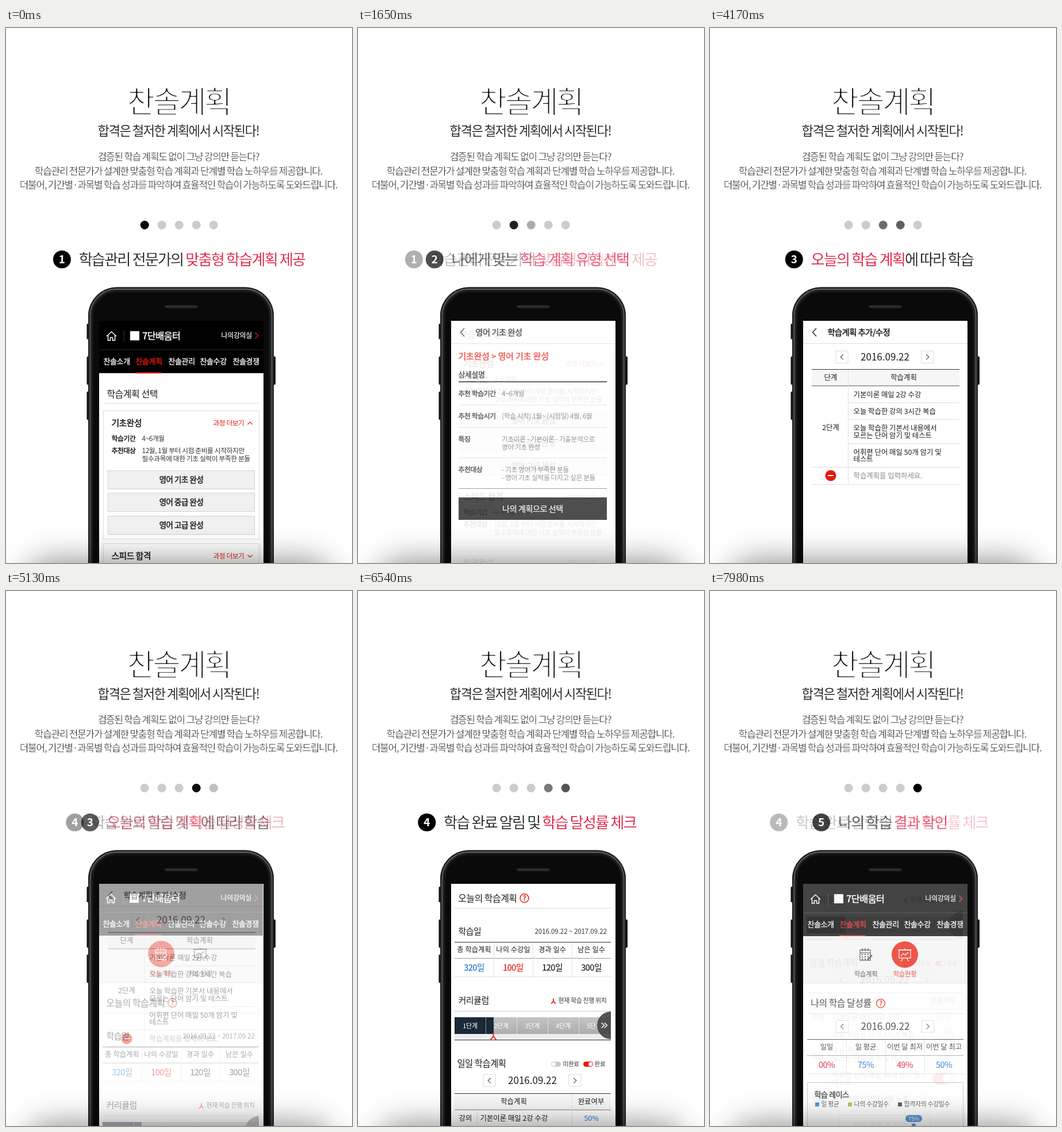
Write an HTML page with a canvas that moves like this. It is 602 by 930 pixels and loops after 8000 ms.

```html
<!DOCTYPE html>
<html lang="ko">
<head>
<meta charset="utf-8">
<title>찬솔계획</title>
<style>
html, body { margin: 0; width: 602px; height: 930px; overflow: hidden; background: #fff; }
canvas { display: block; }
</style>
</head>
<body>
<canvas id="stage" width="602" height="930"></canvas>
<script>
const W = 602, H = 930, LOOP = 8000, STEP = 30, FADE = 450;
const MARKS = [0, 1340, 3270, 4965, 7650];
const RED = '#e8190a', PINK = '#e0163c', BLUE = '#1b76d1', INK = '#1c1c1c', PALE = '#dcdcdc';
const FONT = '"Noto Sans CJK KR", "Noto Sans CJK", "Noto Sans", sans-serif';
const MEDIUM = { pen: 0.5 };
const stage = document.getElementById('stage').getContext('2d');
let c = stage;

function layer(h, draw) {
  const cv = document.createElement('canvas');
  cv.width = W;
  cv.height = h;
  c = cv.getContext('2d');
  draw();
  c = stage;
  return cv;
}

// y is the visual middle of the line; track is in em;
// a positive pen thickens the strokes, a negative one thins them
function text(s, x, y, size, { color = INK, weight = 400, align = 'left', track = -0.03, pen = 0 } = {}) {
  c.font = `${weight} ${size}px ${FONT}`;
  c.letterSpacing = track * size + 'px';
  c.textAlign = align;
  c.fillStyle = c.strokeStyle = color;
  const tx = align === 'left' ? x - size * 0.04 : x, ty = y + size * 0.37;
  c.fillText(s, tx, ty);
  if (pen) {
    c.save();
    if (pen < 0) c.globalCompositeOperation = 'destination-out';
    c.lineWidth = Math.abs(pen);
    c.lineJoin = 'round';
    c.strokeText(s, tx, ty);
    c.restore();
  }
  return c.measureText(s).width;
}
const mid = (s, x, y, size, o) => text(s, x, y, size, { align: 'center', ...o });

function box(x, y, w, h, fill) {
  c.fillStyle = fill;
  c.fillRect(x, y, w, h);
}
function frame(x, y, w, h, color, fill) {
  if (fill) box(x, y, w, h, fill);
  c.strokeStyle = color;
  c.lineWidth = 1;
  c.strokeRect(x + 0.5, y + 0.5, w - 1, h - 1);
}
function round(x, y, w, h, r, fill) {
  c.fillStyle = fill;
  c.beginPath();
  c.roundRect(x, y, w, h, r);
  c.fill();
}
function disc(x, y, r, fill) {
  c.fillStyle = fill;
  c.beginPath();
  c.arc(x, y, r, 0, 7);
  c.fill();
}
function line(color, width, ...p) {
  c.strokeStyle = color;
  c.lineWidth = width;
  c.beginPath();
  for (let i = 0; i < p.length; i += 2) c.lineTo(p[i], p[i + 1]);
  c.stroke();
}
const rule = (x1, x2, y, color = PALE, h = 1) => box(x1, y, x2 - x1, h, color);
const post = (x, y1, y2) => box(x, y1, 1, y2 - y1, '#e2e2e2');
// a negative dx or dy turns the arrow round
const chevron = (x, y, dx, color, w) => line(color, w, x - dx, y - Math.abs(dx) * 1.9, x + dx, y, x - dx, y + Math.abs(dx) * 1.9);
const fold = (x, y, dy) => line(RED, 1.2, x - 4, y - dy, x, y + dy, x + 4, y - dy);

// ---- static page ----
function page() {
  mid('찬솔계획', 300, 128, 53, { track: -0.075, pen: -2.3, color: '#111' });
  mid('합격은 철저한 계획에서 시작된다!', 299.8, 179, 22.4, { track: -0.075, pen: -0.2 });
  ['검증된 학습 계획도 없이 그냥 강의만 듣는다?',
   '학습관리 전문가가 설계한 맞춤형 학습 계획과 단계별 학습 노하우를 제공합니다.',
   '더불어, 기간별·과목별 학습 성과를 파악하여 효율적인 학습이 가능하도록 도와드립니다.'
  ].forEach((s, i) => mid(s, 300, 224 + i * 24.5, 17, { track: -0.075, pen: -0.35, color: '#333' }));
  phone();
}

function phone() {
  for (const [y, h] of [[514, 27], [571, 49], [632, 49]]) round(140.5, y, 5, h, 1.5, '#151515');
  round(464, 571, 5, 49, 1.5, '#151515');
  round(143, 450.5, 323, 560, 50, '#0a0a0a');
  ['#26292a', '#6c7173', '#2a2e30', '#15191b'].forEach((col, i) => {
    const d = 1 + i * 2.4;
    c.strokeStyle = col;
    c.lineWidth = 1.6;
    c.beginPath();
    c.roundRect(143 + d, 450.5 + d, 323 - 2 * d, 560, 50 - d);
    c.stroke();
  });
  round(276, 482, 57, 5, 2.5, '#2b2b2d');
}

function shade() {
  c.shadowColor = 'rgba(0,0,0,.42)';
  c.shadowBlur = 52;
  c.shadowOffsetY = 2000;
  round(30, 924 - 2000, 542, 120, 50, '#000');
}

// ---- headings ----
const HEADS = [
  [97.4, '학습관리 전문가의 ', INK, '맞춤형 학습계획 제공', PINK],
  [133.3, '나에게 맞는 ', INK, '학습 계획 유형 선택', PINK],
  [146.3, '오늘의 학습 계획', PINK, '에 따라 학습', INK],
  [119.8, '학습 완료 알림 및 ', INK, '학습 달성률 체크', PINK],
  [193.7, '나의 학습 ', INK, '결과 확인', PINK]
];
function heading([x, a, ca, b, cb], i) {
  const o = { track: -0.075, pen: -0.25 };
  disc(x, 402.3, 15.5, '#000');
  mid(String(i + 1), x, 402, 19, { weight: 700, color: '#fff', track: 0 });
  const w = text(a, x + 30.3, 402, 26.3, { ...o, color: ca });
  text(b, x + 30.3 + w, 402, 26.3, { ...o, color: cb });
}

// ---- parts of the app ----
function appBar() {
  box(162, 508, 286, 92, '#000');
  line('#fff', 1.5, 175, 536, 183.5, 528, 192, 536);
  line('#fff', 1.5, 177.5, 534, 177.5, 543, 181.5, 543, 181.5, 538, 185.5, 538, 185.5, 543, 189.5, 543, 189.5, 534);
  box(205, 526, 1, 20, '#333');
  box(216, 527, 16, 16, '#fff');
  text('7단배움터', 238, 535, 16.2, { color: '#fff', ...MEDIUM });
  text('나의강의실', 375, 535, 12, { color: '#fff', pen: 0.2 });
  chevron(436, 535, 2.6, RED, 1.5);
  rule(162, 448, 559, '#262626');
  const xs = [170, 226, 283, 338, 395];
  ['소개', '계획', '관리', '수강', '경쟁'].forEach((s, i) =>
    text('찬솔' + s, xs[i], 579.5, 13, { color: i === 1 ? RED : '#fff', pen: 0.3 }));
  rule(225, 271, 598.5, RED, 2);
}

function backBar(title) {
  line('#222', 1.4, 185, 522, 178.5, 529, 185, 536);
  text(title, 205, 529, 14.2, MEDIUM);
  rule(162, 448, 548);
}

function dateRow(x, y) {
  frame(x - 86, y - 11, 22, 22, PALE);
  frame(x + 63, y - 11, 22, 22, PALE);
  chevron(x - 75, y, -2.4, '#555', 1.2);
  chevron(x + 74, y, 2.4, '#555', 1.2);
  mid('2016.09.22', x, y, 17, { track: 0 });
}

function ask(x, y) {
  c.strokeStyle = RED;
  c.lineWidth = 1.4;
  c.beginPath();
  c.arc(x, y, 7.5, 0, 7);
  c.stroke();
  mid('?', x, y, 12, { color: RED, track: 0, ...MEDIUM });
}

function toggle(x, y, w, h, on) {
  round(x, y, w, h, h / 2, on ? RED : '#c9c9c9');
  const r = h / 2 - 1;
  disc(on ? x + w - r - 1 : x + r + 1, y + h / 2, r, '#fff');
}

function calendar(x, y, col) {
  c.strokeStyle = col;
  c.lineWidth = 1.2;
  c.strokeRect(x - 10, y - 8, 18, 18);
  line(col, 1.2, x - 10, y - 3, x + 8, y - 3);
  for (const d of [-6, -1, 4]) line(col, 1.4, x + d, y - 11, x + d, y - 6);
  for (let i = 0; i < 9; i++) box(x - 7 + i % 3 * 5, y - 1 + (i / 3 | 0) * 4, 2, 2, col);
  line(col, 2.4, x + 3, y + 9, x + 11, y + 1);
}
function board(x, y, col) {
  c.strokeStyle = col;
  c.lineWidth = 1.2;
  c.strokeRect(x - 10, y - 8, 20, 14);
  line(col, 1.2, x - 12, y - 8, x + 12, y - 8);
  line(col, 1.2, x, y - 11, x, y - 8);
  line(col, 1.2, x - 3, y + 6, x - 7, y + 12);
  line(col, 1.2, x + 3, y + 6, x + 7, y + 12);
  line(col, 1.2, x - 7, y + 3, x - 3, y - 2, x + 1, y + 1, x + 6, y - 4);
}
function tabs(x, y, pick) {
  box(160, y - 32, 290, 81, '#f3f3f3');
  rule(160, 450, y + 49);
  [[calendar, '학습계획'], [board, '학습현황']].forEach(([icon, s], i) => {
    const on = i === pick, cx = x + i * 68;
    if (on) disc(cx, y, 23, RED);
    icon(cx, y, on ? '#fff' : '#333');
    mid(s, cx, y + 33.5, 11.4, { color: on ? RED : '#333' });
  });
}

function stats(x, y, heads, vals, colors) {
  rule(x, x + 272, y, '#333');
  rule(x, x + 272, y + 28, '#999');
  rule(x, x + 272, y + 60);
  heads.forEach((s, i) => {
    const cx = x + 34 + i * 68;
    if (i) post(x + i * 68, y + 1, y + 60);
    mid(s, cx, y + 13.5, 12.3, { track: 0 });
    mid(vals[i], cx, y + 45, 14.5, { color: colors[i], pen: 0.2 });
  });
}

function marker(x, y, k) {
  line(RED, 1.8, x, y - 5 * k, x, y, x - 4 * k, y + 5 * k);
  line(RED, 1.8, x, y, x + 4 * k, y + 5 * k);
}

// ---- screens ----
function planList() {
  appBar();
  text('학습계획 선택', 176, 636, 16);
  rule(169, 440, 652);
  const card = (y, h, title, open) => {
    frame(169, y, 272, h, PALE);
    text(title, 184, y + 22, 14.8, MEDIUM);
    text('과정 더보기', 361, y + 22, 11.6, { color: RED });
    fold(424.5, y + 22, open ? -2 : 2);
    text('학습기간', 184, y + 49, 11.8, MEDIUM);
    text('4~6개월', 237, y + 49, 11.7, { color: '#333' });
    text('추천대상', 184, y + 70, 11.8, MEDIUM);
    text('12월, 1월 부터 시험 준비를 시작하지만', 237, y + 69.5, 11.7, { color: '#333' });
    text('필수과목에 대한 기초 실력이 부족한 분들', 237, y + 83.5, 11.7, { color: '#333' });
  };
  card(665, 224, '기초완성', true);
  ['기초', '중급', '고급'].forEach((s, i) => {
    const y = 769 + i * 39.5 | 0;
    frame(177, y, 256, 33, '#d2d2d2', '#f0f0f0');
    mid(`영어 ${s} 완성`, 305, y + 16.5, 13.4, MEDIUM);
  });
  card(896, 109, '스피드 합격');
  card(1011, 109, '합격완성');
}

function planDetail() {
  backBar('영어 기초 완성');
  text('기초완성 > 영어 기초 완성', 175, 571, 14.8, { color: RED, track: 0, ...MEDIUM });
  text('상세설명', 175, 602, 12.9, MEDIUM);
  rule(175, 433, 614, '#222', 2);
  const rows = [
    [636, 655, '추천 학습기간', '4~6개월'],
    [675, 694, '추천 학습시기', '(학습 시작) 1월~ (시험일) 4월, 6월'],
    [715, 747, '특징', '기초이론 - 기본이론 - 기출분석으로', '영어 기초 완성'],
    [768, 800, '추천대상', '- 기초 영어가 부족한 분들', '- 영어 기초 실력을 다지고 싶은 분들']
  ];
  rows.forEach(([y, ry, label, ...vals], i) => {
    text(label, 175, y, 11.8, MEDIUM);
    vals.forEach((s, j) => text(s, 250.5, y + j * 14, 11.7, { color: '#666' }));
    rule(175, 433, ry, i === 3 ? '#777' : PALE);
  });
  box(175, 816, 258, 39, '#000');
  mid('나의 계획으로 선택', 304, 835.5, 14.1, { color: '#fff', pen: 0.2 });
}

const cell = (s, x, y, color = INK) => text(s, x, y, 12.4, { color, track: 0 });
const TASKS = ['기본이론 매일 2강 수강', '오늘 학습한 강의 3시간 복습', '오늘 학습한 기본서 내용에서',
  '모르는 단어 암기 및 테스트', '어휘편 단어 매일 50개 암기 및', '테스트'];

function planEdit() {
  backBar('학습계획 추가/수정');
  dateRow(304.5, 572);
  box(177, 594, 257, 28, '#f7f7f7');
  rule(177, 434, 593, '#333');
  rule(177, 434, 621.5, '#555');
  post(240, 594, 793);
  mid('단계', 210, 607, 12.4, { track: 0 });
  mid('학습계획', 337, 607, 12.4, { track: 0 });
  [637, 666, 695, 708, 737, 749.5].forEach((y, i) => cell(TASKS[i], 250, y));
  for (const y of [651, 680, 722]) rule(240, 434, y);
  rule(177, 434, 763);
  rule(177, 434, 793);
  mid('2단계', 210, 694, 12.4, { track: 0 });
  disc(210, 778, 9.5, RED);
  box(205, 777, 10, 2, '#fff');
  cell('학습계획을 입력하세요.', 250, 778, '#888');
}

function planCheck() {
  c.save();
  c.translate(-1, -1);
  appBar();
  c.restore();
  tabs(270, 631, 0);
  text('오늘의 학습계획', 175, 716, 15.9);
  ask(289.5, 716);
  rule(168, 440, 733);
  text('학습일', 175, 773, 15);
  text('2016.09.22 ~ 2017.09.22', 308, 774, 11.4, { track: 0, color: '#333' });
  stats(168, 792, ['총 학습계획', '나의 수강일', '경과 일수', '남은 일수'],
    ['320일', '100일', '120일', '300일'], [BLUE, RED, INK, INK]);
  c.translate(0, 357);
  text('커리큘럼', 175, 536.5, 15);
  marker(340, 538, 0.9);
  text('현재 학습 진행 위치', 349, 537, 10.9, { color: '#333' });
  rule(168, 440, 555, '#ccc');
  const g = c.createLinearGradient(0, 566, 0, 595);
  g.addColorStop(0, '#c4c4c4');
  g.addColorStop(1, '#adadad');
  box(168, 566, 272, 29, g);
  box(168, 566, 68, 29, '#182938');
  box(168, 595, 272, 10, '#ededed');
  rule(168, 440, 605, '#333');
  for (let i = 0; i < 5; i++) {
    if (i) box(168 + i * 54, 566, 1, 29, i === 1 ? '#8a949c' : '#dedede');
    mid(i + 1 + '단계', 195 + i * 54, 580.5, 11, { color: '#fff' });
  }
  c.save();
  c.beginPath();
  c.rect(400, 550, 40, 60);
  c.clip();
  disc(440, 580, 24, 'rgba(70,70,70,.92)');
  c.restore();
  chevron(426, 580, 2.4, '#fff', 1.5);
  chevron(431, 580, 2.4, '#fff', 1.5);
  marker(235.5, 599, 1.25);

  text('일일 학습계획', 173, 646, 15.4);
  toggle(336, 643, 17, 9, false);
  text('미완료', 357, 647, 10.5, { color: '#333' });
  toggle(392, 643, 17, 9, true);
  text('완료', 412, 647, 10.5, { color: '#333' });
  dateRow(303.5, 676);
  box(168, 698, 272, 28, '#f7f7f7');
  rule(168, 440, 698, '#333');
  rule(168, 440, 726.5, '#777');
  post(372, 699, 897);
  post(207, 727, 897);
  const put = (s, x, y, color) => mid(s, x, y, 12.4, { track: 0, color });
  put('학습계획', 271, 712);
  put('완료여부', 405.5, 712);
  put('강의', 187, 741.5);
  put('자습', 187, 809.5);
  put('추가', 187, 883);
  put('50%', 406, 741.5, BLUE);
  put('-', 406, 883);
  [741.5, 771, 799.5, 812, 841, 854].forEach((y, i) => cell(TASKS[i], 213, y));
  cell('사용자가 입력한 내용 노출', 213, 883);
  [760, 795, 837].forEach((y, i) => toggle(387, y, 38, 21, i === 2));
  for (const [x, y] of [[168, 755], [207, 785], [207, 827], [168, 868], [168, 897]]) rule(x, 440, y);
  frame(225, 911, 159, 37, '#444');
  mid('학습계획 추가/수정', 304, 929, 14);
}

function planResult() {
  appBar();
  tabs(271, 632, 1);
  text('나의 학습 달성률', 176, 716.5, 15.9);
  ask(297, 717);
  rule(169, 441, 734);
  dateRow(305, 757);
  stats(169, 779, ['일일', '일 평균', '이번 달 최저', '이번 달 최고'],
    ['00%', '75%', '49%', '50%'], [PINK, BLUE, PINK, BLUE]);
  frame(169, 854, 272, 200, '#bbb');
  text('학습 레이스', 182, 875, 13, MEDIUM);
  [[183, BLUE, '일 평균'], [240, '#9ab81c', '나의 수강일수'], [327, '#22303c', '합격자의 수강일수']]
    .forEach(([x, col, s]) => {
      box(x, 889, 7, 7, col);
      text(s, x + 11, 892, 10.9, { color: '#333' });
    });
  round(340, 911, 29, 12, 6, '#2a72c8');
  mid('75%', 354.5, 917, 9.5, { color: '#fff', track: 0 });
  disc(354.5, 929, 3.5, '#2a72c8');
}

const base = layer(H, page);
const shadow = layer(H, shade);
const heads = HEADS.map((h, i) => layer(H, () => heading(h, i)));
const screens = [planList, planDetail, planEdit, planCheck, planResult].map(draw => layer(1300, () => {
  box(160, 0, 290, 1300, '#fff');
  draw();
}));

// ---- motion ----
const span = (t, a, b) => Math.min(1, Math.max(0, (t - a) / (b - a)));
const scrollOf = (i, t) =>
  Math.round(i === 0 ? 103 * span(t, 0, 500) : i === 3 ? 357 * span(t, 6270, 6800) : 0);

function show(i, t, alpha) {
  c.globalAlpha = alpha;
  c.drawImage(heads[i], 0, 0);
  c.save();
  c.beginPath();
  c.rect(162, 509, 286, 421);
  c.clip();
  c.drawImage(screens[i], 0, -scrollOf(i, t));
  c.restore();
  c.globalAlpha = 1;
}

function render(t) {
  box(0, 0, W, H, '#fff');
  c.drawImage(base, 0, 0);
  box(162, 509, 286, 421, '#fff');

  let pos = 0;
  for (let i = 0; i < 4; i++) pos += span(t, MARKS[i], MARKS[i + 1]);
  for (let i = 0; i < 5; i++) {
    const v = Math.round(204 * Math.min(1, Math.abs(pos - i)));
    disc(241.2 + i * 30, 342.5, 7.5, `rgb(${v},${v},${v})`);
  }

  let now = 0;
  while (now < 4 && t >= MARKS[now + 1]) now++;
  const p = now ? span(t, MARKS[now], MARKS[now] + FADE) : 1;
  if (p < 1) show(now - 1, t, 1 - p);
  show(now, t, p);
  c.drawImage(shadow, 0, 0);
}

let start;
function tick(ms) {
  start ??= ms;
  render(Math.floor((ms - start) % LOOP / STEP) * STEP);
  requestAnimationFrame(tick);
}
render(0);
requestAnimationFrame(tick);
</script>
</body>
</html>
```
